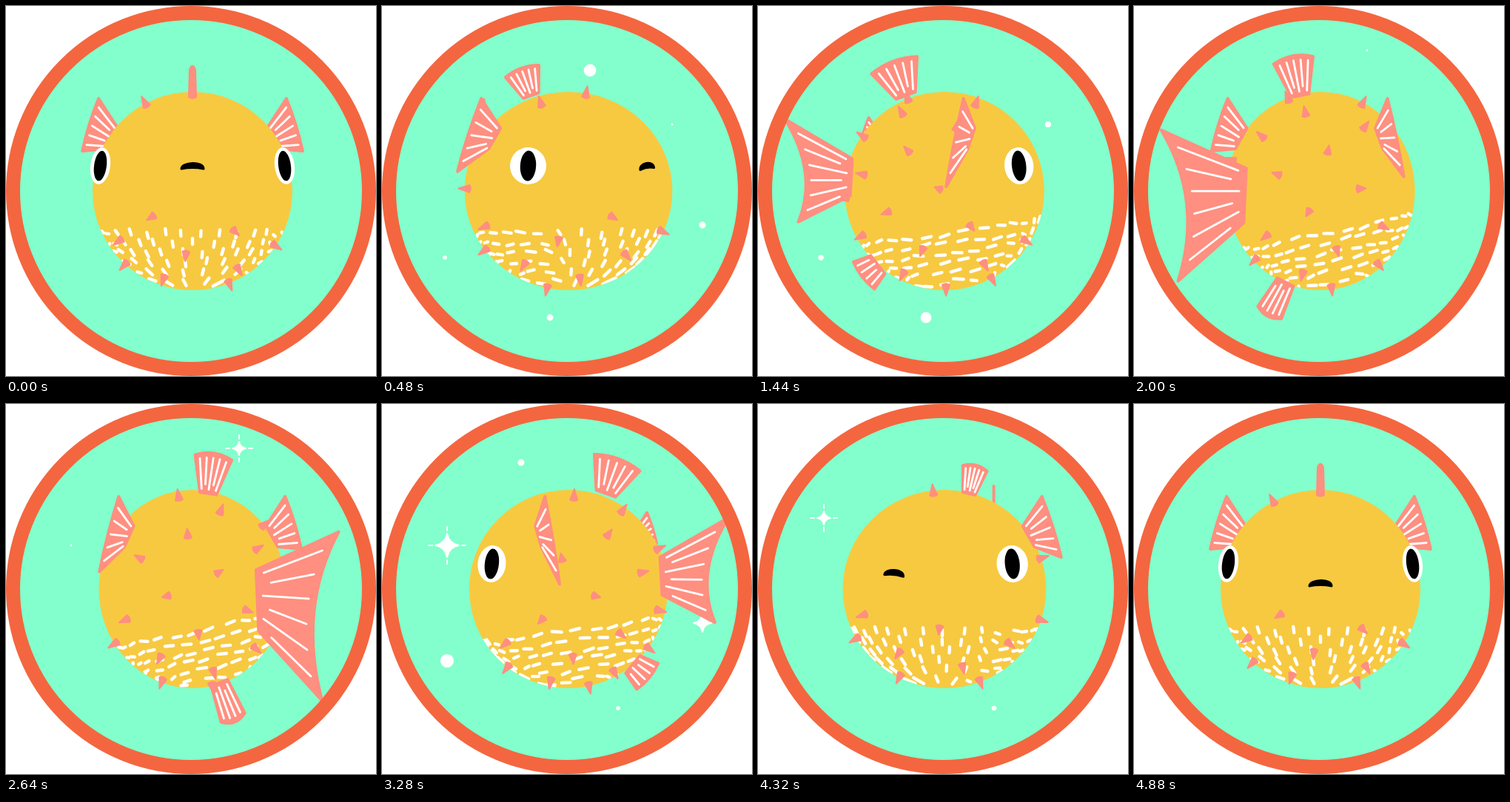
An HTML page with a canvas for the animation above (4.96 s loop, 500 by 500 pixels).

```html
<!DOCTYPE html>
<html>
<head>
<meta charset="utf-8">
<style>
html, body { margin: 0; width: 100%; height: 100%; overflow: hidden; background: #fff; }
canvas { display: block; width: 100%; height: 100%; }
</style>
</head>
<body>
<canvas id="stage" width="500" height="500"></canvas>
<script>
const ctx = document.getElementById('stage').getContext('2d');
const STEP = 80, STEPS = 62, TAU = Math.PI * 2, RAD = Math.PI / 180;
const WATER = '#82ffcc', RING = '#f4663f', BODY = '#f7c941', PINK = '#ff8f80';
const { sin, cos, tanh, abs, sqrt, hypot, min, max } = Math;

// Step and heading in degrees; 0 faces the viewer, 180 faces away
const turns = [[0, 0], [12, 102], [25, 155], [33, 199], [41, 231], [48, 303], [61, 360], [62, 360]];

// x, y, first step, size, bubble
const sparkles = [
  [281, 87, 2, 10, true], [227, 421, 5, 10, true], [88, 347, 36, 10, true],
  [392, 160, 5, 8], [433, 296, 1, 12], [85, 340, 4, 18], [315, 60, 24, 9],
  [88, 191, 32, 16], [433, 296, 33, 12], [319, 411, 39, 13], [188, 79, 36.5, 12], [89, 154, 44, 9]
];
const SPARKLE_STEPS = 16;

const mix = (a, b, t) => a + (b - a) * t;
const clamp = v => min(1, max(0, v));
const wrap = deg => (deg + 540) % 360 - 180;
const random = n => abs(sin(n * 127.1 + 3.7) * 43758.5) % 1;

function yawAt(step) {
  const i = turns.findIndex(([end]) => end > step);
  const [s0, y0] = turns[i - 1], [s1, y1] = turns[i];
  return mix(y0, y1, (step - s0) / (s1 - s0));
}

function oval(x, y, rx, ry, color, turn = 0) {
  ctx.fillStyle = color;
  ctx.beginPath();
  ctx.ellipse(x, y, rx, ry, turn, 0, TAU);
  ctx.fill();
}

function line(x1, y1, x2, y2, width) {
  ctx.strokeStyle = '#fff';
  ctx.lineWidth = width;
  ctx.beginPath();
  ctx.moveTo(x1, y1);
  ctx.lineTo(x2, y2);
  ctx.stroke();
}

function fillRound(color, width) {
  ctx.fillStyle = ctx.strokeStyle = color;
  ctx.lineWidth = width;
  ctx.closePath();
  ctx.fill();
  ctx.stroke();
}

function makeBody(step) {
  const yaw = yawAt(step), a = yaw * RAD;
  return {
    step, yaw, cx: 252, cy: 250, ry: 134,
    rx: 130 + 5 * cos(a) + 12 * sin(a) ** 2
  };
}

// Point on the body surface; lon in degrees, v from -1 (top) to 1
function project(body, lon, v) {
  const a = (lon + body.yaw) * RAD, c = sqrt(max(0, 1 - v * v)), u = c * sin(a);
  return { u, v, z: c * cos(a), x: body.cx + body.rx * u, y: body.cy + body.ry * v };
}

// Corners run base, tip, tip, base; bulge bends the outer edge
function drawFin({ corners: [a, c, d, b], bulge, rays }) {
  const bend = n => mix((a[n] + b[n]) / 2, (c[n] + d[n]) / 2, 1 + bulge);
  const q = [bend(0), bend(1)];
  ctx.beginPath();
  ctx.moveTo(...a);
  ctx.lineTo(...c);
  ctx.quadraticCurveTo(...q, ...d);
  ctx.lineTo(...b);
  fillRound(PINK, 4);
  if (hypot(c[0] - d[0], c[1] - d[1]) < 15) return;
  for (let i = 0; i < rays; i++) {
    const t = (i + .6) / (rays + .2), s = 1 - t;
    const at = (n, k) => mix(mix(a[n], b[n], t), s * s * c[n] + 2 * s * t * q[n] + t * t * d[n], k);
    const from = i % 2 ? .22 : .1;
    line(at(0, from), at(1, from), at(0, .88), at(1, .88), 2.8);
  }
}

// Symmetric fan; angle is measured clockwise from straight up
function fan(x, y, angle, length, baseHalf, tipHalf) {
  const point = (side, out) => [
    x + side * cos(angle) + out * sin(angle),
    y + side * sin(angle) - out * cos(angle)
  ];
  return [point(-baseHalf, 0), point(-tipHalf, length), point(tipHalf, length), point(baseHalf, 0)];
}

function dorsalFin({ yaw, cx }) {
  const s = sin(yaw * RAD), back = max(0, -cos(yaw * RAD));
  const half = 3 + 27 * abs(s) + 14 * back;
  return {
    corners: fan(cx - 65 * s, 121, -.45 * s, 35 + 15 * back, 3 + half * .33, half),
    bulge: .25, rays: 5, front: true
  };
}

function analFin({ yaw, cx }) {
  const a = wrap(yaw + 180) * RAD, s = sin(a), c = max(0, cos(a));
  const grow = clamp((cos(a) + .3) / .3);
  return {
    corners: fan(cx + 112 * s, 332 + 50 * c * c, Math.PI - 65 * RAD * s,
      grow * (15 + 42 * c ** 3), grow * (11 + 7 * s * s), grow * (16 + 11 * s * s)),
    bulge: .25, rays: 4, front: cos(a) > 0
  };
}

function sideFin(body, side) {
  const { x, y, z } = project(body, side * 108, -.53);
  const lean = tanh(wrap(body.yaw + side * 140) / 20);
  const grow = clamp((z + .7) / .4), near = max(0, z);
  const at = (dx, dy) => [x + dx * lean * grow, y + dy * grow];
  return {
    corners: [at(-8, -14), at(18, -54), at(40 + 22 * near, 17 + 60 * near), at(8, 14)],
    bulge: .1, rays: 5, front: z > -.15
  };
}

// The tail whips quickly past the viewer from one side to the other
function tailFin({ yaw, cx, rx }) {
  const off = wrap(yaw + 180), lon = (abs(off) > 90 ? off : 90 * tanh(off / 32)) * RAD;
  const s = sin(lon), z = cos(lon), size = max(0, 1 + 1.3 * z);
  const x = cx + rx * .95 * s, y = 225 + 60 * z;
  const tipX = x + 70 * size * s, tipY = 210 + 115 * z, flare = 8 * size * s;
  return {
    corners: [
      [x - flare * .3, y - 22 * size], [tipX + flare, tipY - 61 * size],
      [tipX - flare, tipY + 61 * size], [x, y + 22 * size]
    ],
    bulge: -.45, rays: 6, front: z > -.05
  };
}

// Dashes stand upright under the mouth and lie flat along the sides
function drawBelly(body) {
  const { cx, cy, rx, ry, yaw } = body;
  ctx.save();
  ctx.beginPath();
  ctx.ellipse(cx, cy, rx, ry, 0, 0, TAU);
  ctx.clip();
  ctx.translate(cx, cy);
  ctx.rotate(-13 * RAD * max(0, -cos(yaw * RAD)));
  ctx.translate(-cx, -cy);
  for (let row = 0; row < 6; row++) {
    const v0 = .43 + row * .097, c = sqrt(1 - v0 * v0), count = Math.round(32 * c);
    for (let i = 0; i < count; i++) {
      const seed = row * 50 + i;
      const lon = (i + random(row) + .3 * random(seed)) / count * 360 - 180;
      const v = v0 + .04 * (random(seed + 9) - .5);
      const flat = clamp((abs(wrap(lon)) - 50) / 25);
      const along = 2.7 * flat / c, down = mix(.03, .02 * (random(seed + 5) - .5), flat);
      const p = project(body, lon - along, v - down), q = project(body, lon + along, v + down);
      if (p.z + q.z > .06) line(p.x, p.y, q.x, q.y, 4.4);
    }
  }
  ctx.restore();
}

// Spikes spiral evenly over the body, leaving the face and cheeks clear
function drawSpikes(body) {
  const count = 42;
  for (let i = 0; i < count; i++) {
    const lon = i * 137.5, v = (2 * i + 1) / count - 1;
    const onFace = v > -.85 && v < .18 && cos(lon * RAD) > -.35;
    const p = project(body, lon, v);
    if (onFace || p.z < -.08) continue;
    ctx.save();
    ctx.translate(p.x, p.y);
    ctx.rotate(Math.atan2(p.v, p.u));
    ctx.beginPath();
    ctx.moveTo(-4, -5);
    ctx.lineTo(5 + 6 * hypot(p.u, p.v), 0);
    ctx.lineTo(-4, 5);
    ctx.quadraticCurveTo(-7, 0, -4, -5);
    fillRound(PINK, 2);
    ctx.restore();
  }
}

function drawFace({ cx, rx, yaw, step }) {
  for (const side of [-75, 75]) {
    const a = (side + yaw) * RAD, front = cos(a);
    if (front < .2) continue;
    const x = cx + rx * .955 * sin(a), tilt = -8 * RAD * sin(a);
    oval(x, 216, 9 + 17 * front, 25, '#fff', tilt);
    oval(x, 216, 7.5 + 3.5 * front, 20.5, '#000', tilt);
  }
  const a = yaw * RAD, half = 15 * cos(a);
  if (half < 2) return;
  ctx.save();
  ctx.translate(cx + rx * .97 * sin(a), 217 + 2 * max(0, step - 48));
  ctx.rotate(-.2 * sin(a));
  ctx.beginPath();
  ctx.moveTo(-half, 3);
  ctx.bezierCurveTo(-half, -6, half, -8, half, 3);
  ctx.quadraticCurveTo(0, 0, -half, 3);
  fillRound('#000', 3);
  ctx.restore();
}

function drawStar(x, y, r) {
  ctx.beginPath();
  ctx.moveTo(x, y - r);
  for (let i = 1; i <= 4; i++) {
    const a = i * TAU / 4, m = a - TAU / 8;
    ctx.quadraticCurveTo(x + sin(m) * r * .22, y - cos(m) * r * .22, x + sin(a) * r, y - cos(a) * r);
  }
  fillRound('#fff', 2);
}

// A sparkle grows from a dot to a star, throws rays and fades to a dot
function drawSparkle([x, y, start, size, bubble], step) {
  const k = (step - start) / SPARKLE_STEPS;
  if (k <= 0 || k >= 1) return;
  const dot = r => oval(x, y, r, r, '#fff');
  if (bubble) dot(size * sqrt(sin(Math.PI * k)));
  else if (k < .35) dot(4.5 * min(1, k / .2));
  else if (k < .65) drawStar(x, y, size * min(1, .5 + (k - .35) * 5));
  else dot(mix(5, 3, (k - .65) / .35));
  if (k < .52 || k > .8) return;
  const arms = bubble ? 8 : 4, inner = bubble ? 38 : size + 4, outer = bubble ? 38 : size + 9;
  for (let i = 0; i < arms; i++) {
    const c = cos(i * TAU / arms), s = sin(i * TAU / arms);
    line(x + c * inner, y + s * inner, x + c * outer, y + s * outer, 2);
  }
}

function draw(step) {
  const body = makeBody(step);
  const fins = [dorsalFin(body), analFin(body), sideFin(body, -1), sideFin(body, 1), tailFin(body)];
  ctx.clearRect(0, 0, 500, 500);
  ctx.lineCap = ctx.lineJoin = 'round';
  ctx.save();
  ctx.beginPath();
  ctx.arc(250, 250, 240, 0, TAU);
  ctx.clip();
  oval(250, 250, 240, 240, WATER);
  sparkles.forEach(s => drawSparkle(s, step));
  fins.filter(f => !f.front).forEach(drawFin);
  oval(body.cx, body.cy, body.rx, body.ry, BODY);
  drawBelly(body);
  drawSpikes(body);
  drawFace(body);
  fins.filter(f => f.front).forEach(drawFin);
  ctx.restore();
  ctx.strokeStyle = RING;
  ctx.lineWidth = 19;
  ctx.beginPath();
  ctx.arc(250, 250, 240.5, 0, TAU);
  ctx.stroke();
}

function tick() {
  draw(Math.floor(performance.now() / STEP) % STEPS);
  requestAnimationFrame(tick);
}
tick();
</script>
</body>
</html>
```
